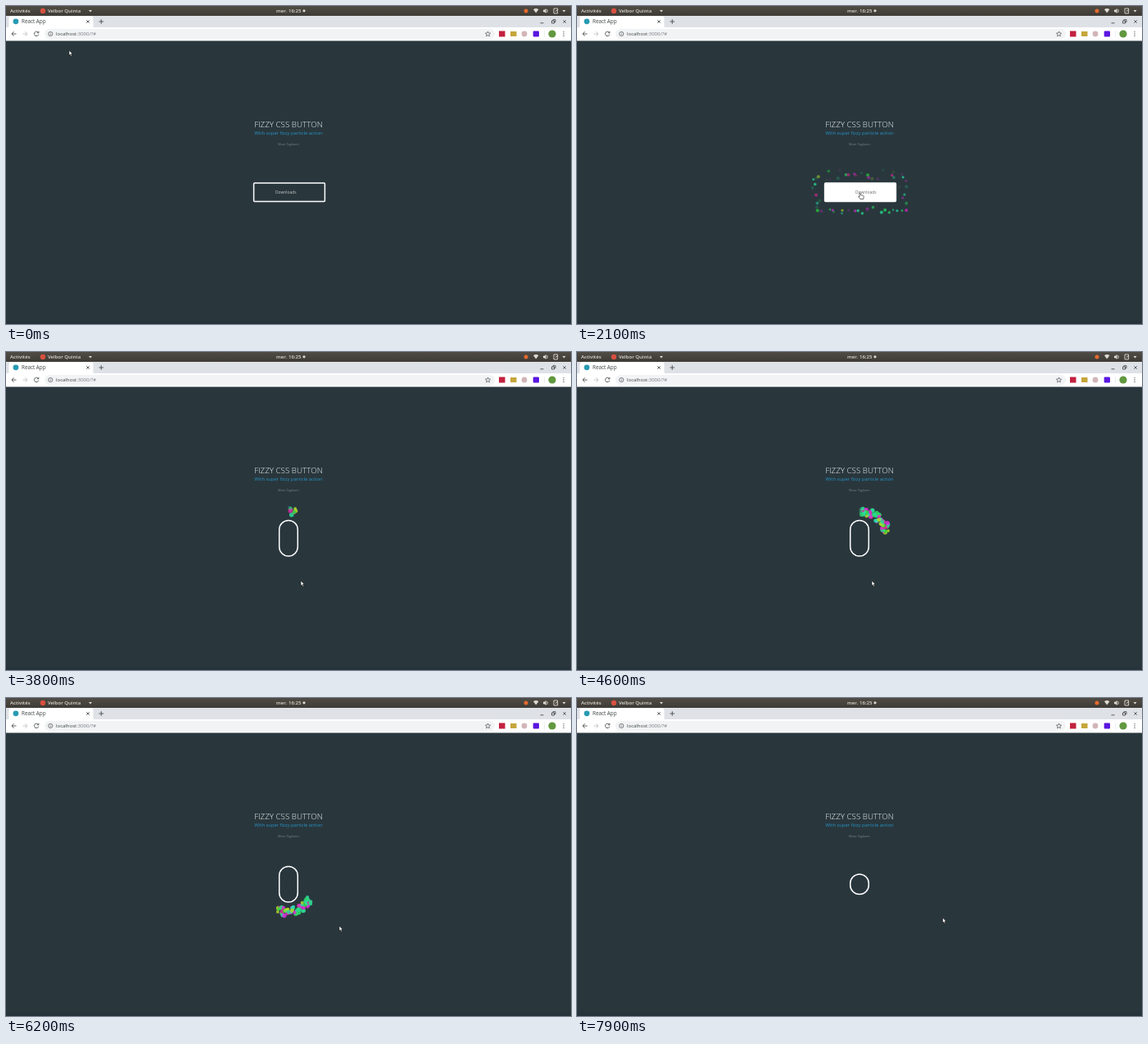
An HTML page that plays this animation: 690 by 388 pixels, repeating every 8 s.

```html
<!DOCTYPE html>
<html lang="fr">
<head>
<meta charset="utf-8">
<title>Fizzy button</title>
<style>
  html, body { margin: 0; width: 100%; height: 100%; overflow: hidden; background: #29373d; }
  svg { display: block; width: 100vw; height: 100vh; }
  text { font-family: "Open Sans", "Noto Sans", sans-serif; }
  .bar { font-size: 6px; font-weight: 600; fill: #dfdbd2; }
  .ui { font-size: 6px; fill: #3c4043; }
  .line { fill: none; stroke: #4a4e52; stroke-width: .9; }
  .mid { text-anchor: middle; }
</style>
</head>
<body>
<svg viewBox="0 0 690 388">
  <defs>
    <linearGradient id="panel" x2="0" y2="1">
      <stop stop-color="#504c45"/><stop offset="1" stop-color="#3e3b36"/>
    </linearGradient>
    <filter id="soft" x="-50%" y="-50%" width="200%" height="200%"><feGaussianBlur stdDeviation=".4"/></filter>
  </defs>
  <rect width="690" height="388" fill="#29373d"/>
  <rect y="384" width="690" height="4" fill="#26333a"/>

  <!-- desktop panel -->
  <rect width="690" height="12" fill="url(#panel)"/>
  <text class="bar" x="5" y="8.2">Activités</text>
  <circle cx="45" cy="6" r="3.2" fill="#d9503f"/>
  <text class="bar" x="51" y="8.2">Velbor Quinta</text>
  <text class="bar" x="330" y="8.2">mer. 16:25</text>
  <circle cx="364" cy="5.8" r="1.6" fill="#dfdbd2"/>
  <circle cx="635" cy="6" r="2.5" fill="#e4692c"/>
  <g fill="#dfdbd2">
    <path d="M101 5h4l-2 2.6zM679.5 5h4l-2 2.6z"/>
    <path d="M644 4.2q3.2-2.4 6.4 0l-3.2 4.4z"/>
    <path d="M656 4.8h1.5l2-1.8v6l-2-1.8H656z"/>
  </g>
  <path d="M660.6 4q1.4 2 0 4M669 3h4.6v6H669zM671 6.5l3-2" fill="none" stroke="#dfdbd2" stroke-width=".9"/>

  <!-- browser tabs -->
  <rect y="12" width="690" height="15" fill="#dee1e6"/>
  <path d="M1 27q2.5 0 2.5-2.5V15q0-2.5 2.5-2.5h98q2.5 0 2.5 2.5v9.5q0 2.5 2.5 2.5z" fill="#fff"/>
  <circle cx="12" cy="18.8" r="3.4" fill="#279bb3"/>
  <text class="ui" x="19" y="21.2" style="font-size:6.3px">React App</text>
  <path class="line" d="M98.3 17.3l3.4 3.4m0-3.4l-3.4 3.4M113.5 19h5.6m-2.8-2.8v5.6M652.5 20.8h4M666.5 18h3v3h-3zM668 18v-1.3h3v3h-1.3M680.4 17.3l3.4 3.4m0-3.4l-3.4 3.4"/>

  <!-- toolbar -->
  <rect y="26" width="690" height="16.5" fill="#fff"/>
  <rect x="47" y="28" width="550" height="12" rx="6" fill="#f1f3f4"/>
  <path class="line" d="M12.5 34H7m2.6-2.7L7 34l2.6 2.7"/>
  <path class="line" d="M20.5 34H26m-2.6-2.7L26 34l-2.6 2.7" style="stroke:#bfc2c5"/>
  <path class="line" d="M39.4 32.4a2.7 2.7 0 1 0 .4 2.2M39.9 30.8v2h-2"/>
  <circle class="line" cx="54.3" cy="34" r="2.6" style="stroke-width:.7"/>
  <path class="line" d="M54.3 33.6v1.8m0-2.9v.5" style="stroke-width:.7"/>
  <text class="ui" x="61" y="36.2" fill="#222">localhost<tspan fill="#777b80">:3000/?#</tspan></text>
  <path class="line" style="stroke-width:.7" d="M588.5 31l.9 2 2.2.2-1.7 1.5.5 2.2-1.9-1.2-1.9 1.2.5-2.2-1.7-1.5 2.2-.2z"/>
  <rect x="602" y="30.5" width="7.5" height="7" fill="#c3213f"/>
  <rect x="616" y="31" width="7.5" height="6" fill="#c5a63a"/>
  <circle cx="633" cy="34" r="3.4" fill="#d3b5b8"/>
  <rect x="643.7" y="30.5" width="7.3" height="7" rx="1" fill="#5a16e0"/>
  <path d="M657.5 30v8" stroke="#e0e2e5" stroke-width=".6"/>
  <circle cx="667" cy="34" r="4.6" fill="#61983f"/>
  <g fill="#4a4e52"><circle cx="681" cy="31.6" r=".7"/><circle cx="681" cy="34" r=".7"/><circle cx="681" cy="36.4" r=".7"/></g>

  <!-- page -->
  <text class="mid" x="345" y="147.8" fill="#f0f2f3" style="font-size:9.8px;font-weight:300">FIZZY CSS BUTTON</text>
  <text class="mid" x="345" y="157.2" fill="#2793c6" style="font-size:5.85px">With super fizzy particle action</text>
  <text class="mid" x="345" y="169.8" fill="#77838a" style="font-size:3.9px">More Tagloom</text>
  <g id="spots" filter="url(#soft)"></g>
  <rect id="button" stroke="#fff" stroke-width="1.5"/>
  <text id="label" y="229" style="font-size:4.9px">Downloads</text>

  <g id="cursor" stroke="#111" stroke-width=".6" stroke-linejoin="round" fill="#fff">
    <path id="arrow" d="M0 0v6.2l1.4-1.2 1 2.3 1.1-.5-1-2.2h1.9z"/>
    <path id="hand" d="M-.2 .2q.8-.7 1.3.3l.4 2 3 .8q.9.4.7 1.5l-.5 2.9H1L-1.2 4.8q0-1 1.4-.4z"/>
  </g>
</svg>
<script>
const LOOP = 8000, COUNT = 56;
const $ = id => document.getElementById(id);
const set = (el, attrs) => { for (const k in attrs) el.setAttribute(k, attrs[k]); };
const mix = (a, b, p) => a + (b - a) * p;
const ramp = (t, from, to) => Math.min(1, Math.max(0, (t - from) / (to - from)));
const ease = (t, from, to) => { const p = ramp(t, from, to); return p * p * (3 - 2 * p); };

let seed = 11;
const random = () => (seed = seed * 16807 % 2147483647) / 2147483647;

const hues = [140, 300, 155, 75, 325, 125, 305, 165];
const spots = Array.from({ length: COUNT }, (_, i) => {
  const el = document.createElementNS("http://www.w3.org/2000/svg", "circle");
  $("spots").append(el);
  return {
    el, place: (i + random() * .7) / COUNT, reach: mix(9, 17, random()), period: mix(800, 1300, random()),
    phase: random(), size: random(), hue: hues[Math.floor(random() * hues.length)],
    lag: i / COUNT * 1000 + random() * 50, orbit: mix(29, 38, random())
  };
});

// time, x, y
const cursorPath = [
  [400, 77, 54], [1000, 362, 249], [1200, 363, 241], [1450, 345, 228], [3450, 345, 228],
  [3800, 360, 279], [4600, 360, 279], [4800, 407, 278], [6200, 407, 278], [6550, 446.5, 268]
];
function cursorAt(t) {
  let [, x, y] = cursorPath[0];
  for (let i = 1; i < cursorPath.length; i++) {
    const p = ease(t, cursorPath[i - 1][0], cursorPath[i][0]);
    x = mix(x, cursorPath[i][1], p);
    y = mix(y, cursorPath[i][2], p);
  }
  return [x, y];
}

// Point on the outline of a box, u running once around it
function onBox(u, w, h) {
  let s = u * 4 * (w + h);
  if (s < 2 * w) return [s - w, -h];
  if ((s -= 2 * w) < 2 * h) return [w, s - h];
  if ((s -= 2 * h) < 2 * w) return [w - s, h];
  return [-w, h - (s - 2 * w)];
}

function drawSpot(s, t) {
  let x, y, r, alpha, light;
  if (t < 3600) {
    const p = (t / s.period + s.phase) % 1;
    const d = mix(2, s.reach, Math.sqrt(p));
    [x, y] = onBox(s.place, 44 + d, 12 + d);
    x += 346; y += 227.5;
    r = mix(1.2, 2.1, s.size);
    alpha = Math.sin(Math.PI * p) * .75 * ramp(t, 1300, 1650) * (1 - ramp(t, 3300, 3550));
    light = 50;
  } else {
    const turn = (t - 3590 - s.lag) * .0785;
    const angle = (turn - 90) * Math.PI / 180;
    const orbit = s.orbit + 1.5 * Math.sin(t / 260 + s.phase * 6.28);
    x = 345 + orbit * Math.cos(angle);
    y = 227 + orbit * Math.sin(angle);
    r = mix(1.7, 2.8, s.size);
    alpha = .85 * ramp(turn, 0, 6) * (1 - ramp(t, 7500, 7700));
    light = 52;
  }
  set(s.el, { cx: x, cy: y, r, opacity: alpha, fill: `hsl(${s.hue} 72% ${light}%)` });
}

function draw(t) {
  const hover = ease(t, 1120, 1520);
  const clicked = ease(t, 3300, 3700);
  const done = ease(t, 7600, 7850);

  const cx = mix(346, 345, clicked);
  const w = mix(43.4, 11.3, clicked);
  const h = mix(mix(11.2, 21.8, clicked), 12.3, done);
  set($("button"), {
    x: cx - w, y: 227.3 - h, width: 2 * w, height: 2 * h, rx: mix(1, 11.3, clicked),
    fill: `rgba(255,255,255,${hover * (1 - clicked)})`
  });

  const grey = mix(200, 105, hover);
  set($("label"), {
    x: mix(329, 340, hover), fill: `rgb(${grey},${grey},${grey})`, opacity: 1 - ramp(t, 3300, 3450)
  });
  spots.forEach(s => drawSpot(s, t));

  const [x, y] = cursorAt(t);
  const pointing = t >= 1150 && t < 3600;
  set($("cursor"), { transform: `translate(${x} ${y})` });
  set($("arrow"), { visibility: pointing ? "hidden" : "visible" });
  set($("hand"), { visibility: pointing ? "visible" : "hidden" });
}

function tick() {
  draw(performance.now() % LOOP);
  requestAnimationFrame(tick);
}
tick();
</script>
</body>
</html>
```
